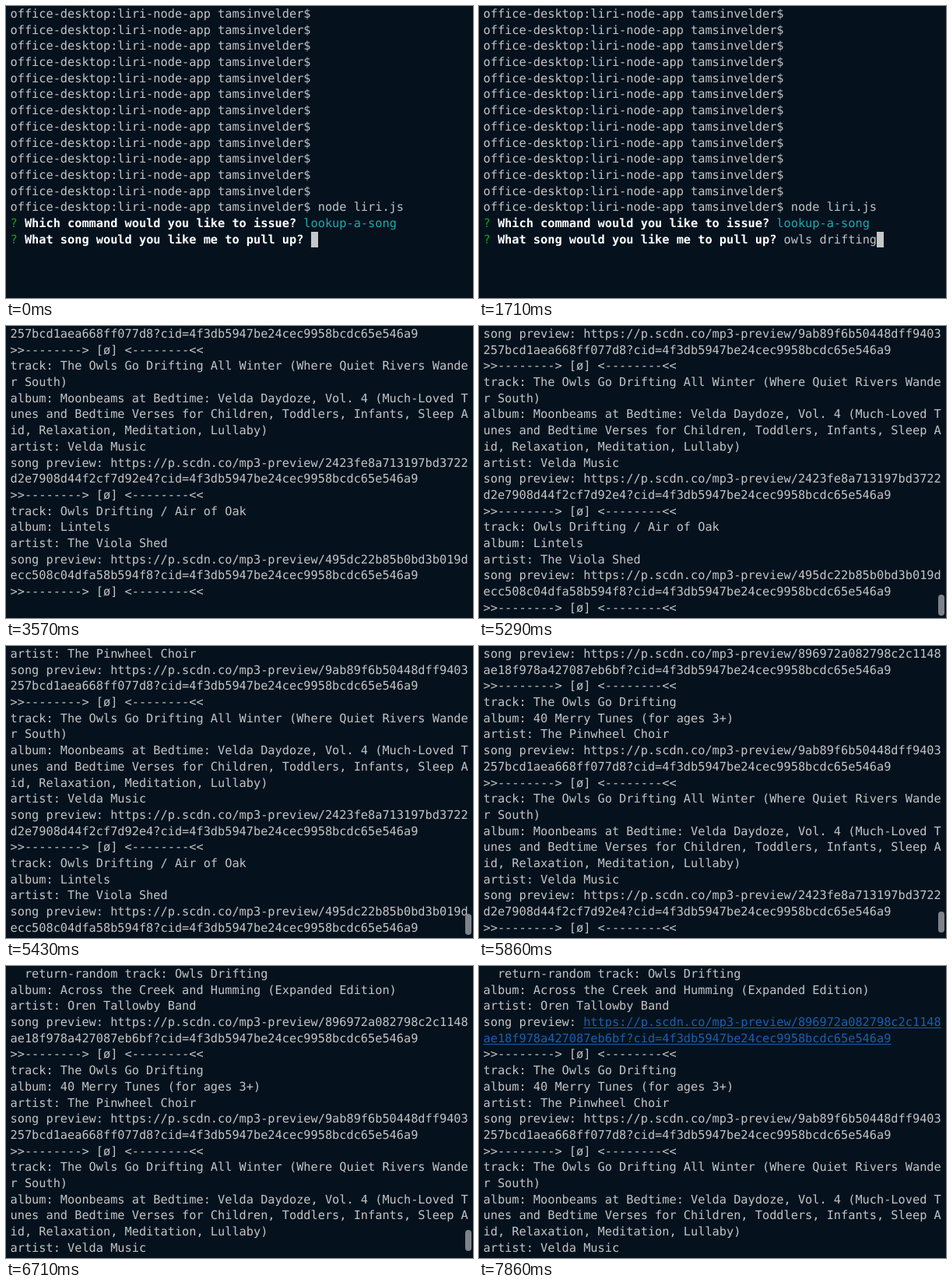
These frames come from a looping animation (600x375 px, 8000 ms). An HTML page:

```html
<!DOCTYPE html>
<html lang="en">
<head>
<meta charset="utf-8">
<title>Terminal session</title>
<style>
  html, body { margin: 0; width: 100%; height: 100%; overflow: hidden; background: #05121e; }
  #stage { position: relative; width: 600px; height: 375px; overflow: hidden; }
  #screen {
    position: absolute; left: 5.5px; top: 0;
    font: 15.27px/20.7px "DejaVu Sans Mono", monospace;
    font-variant-ligatures: none;
    text-rendering: geometricPrecision;
    white-space: pre; color: #c3c5c5;
  }
  #screen div { height: 20.7px; }
  .ask { color: #fff; font-weight: bold; }
  .mark { color: #1c9c1a; }
  .pick { color: #1fa9ac; }
  .link { color: #1c5fae; text-decoration: underline; text-decoration-thickness: 1px; text-underline-offset: 2px; }
  .cursor { display: inline-block; vertical-align: top; width: 9.2px; height: 20.5px; background: #c7c7c7; }
  #thumb { position: absolute; left: 589.5px; width: 8px; height: 27px; border-radius: 4px; background: #7d8389; }
</style>
</head>
<body>
<div id="stage"><div id="screen"></div><div id="thumb"></div></div>
<script>
const LOOP = 8000, COLS = 64, ROWS = 18;
const screen = document.getElementById('screen');
const thumb = document.getElementById('thumb');

const PROMPT = 'office-desktop:liri-node-app tamsinvelder$';
const SONG = 'owls drifting';
const SEPARATOR = '>>--------> [ø] <--------<<';

// Step tables: [time in ms, value from then on]
const typed = [[0, 0], [140, 2], [290, 3], [570, 4], [710, 5], [860, 6], [1000, 7],
  [1140, 9], [1290, 10], [1430, 11], [1570, 12], [1710, 13]];
const tracksShown = [[0, 0], [3000, 1], [3140, 2], [3290, 3], [3430, 4]];
const scrolled = [[0, 0], [5290, 1], [5430, 2], [5710, 5], [5860, 7], [6000, 8.2],
  [6140, 9.1], [6290, 9.7], [6430, 10.1], [6570, 10.4], [6710, 10.6]];
const thumbAlpha = [[0, 0], [5290, 1], [6860, 0.5], [7000, 0]];
const ENTER = 2140, MENU = 2710, HOVER = 7860;

const at = (steps, t) => steps.findLast(([start]) => start <= t)[1];
const wrap = text => text.match(new RegExp(`.{1,${COLS}}`, 'g'));

function trackLines(track, album, artist, hash) {
  const url = `https://p.scdn.co/mp3-preview/${hash}?cid=4f3db5947be24cec9958bcdc65e546a9`;
  return [`track: ${track}`, `album: ${album}`, `artist: ${artist}`, `song preview: ${url}`, SEPARATOR]
    .flatMap(wrap);
}

const tracks = [
  trackLines('Owls Drifting', 'Across the Creek and Humming (Expanded Edition)',
    'Oren Tallowby Band', '896972a082798c2c1148ae18f978a427087eb6bf'),
  trackLines('The Owls Go Drifting', '40 Merry Tunes (for ages 3+)',
    'The Pinwheel Choir', '9ab89f6b50448dff9403257bcd1aea668ff077d8'),
  trackLines('The Owls Go Drifting All Winter (Where Quiet Rivers Wander South)',
    'Moonbeams at Bedtime: Velda Daydoze, Vol. 4 (Much-Loved Tunes and Bedtime Verses ' +
    'for Children, Toddlers, Infants, Sleep Aid, Relaxation, Meditation, Lullaby)',
    'Velda Music', '2423fe8a713197bd3722d2e7908d44f2cf7d92e4'),
  trackLines('Owls Drifting / Air of Oak', 'Lintels',
    'The Viola Shed', '495dc22b85b0bd3b019decc508c04dfa58b594f8')
];

// A line is a list of [text, class] parts
const plain = text => [[text, '']];
const cursor = ['', 'cursor'];
const question = (text, ...rest) => [['?', 'mark'], [` ${text} `, 'ask'], ...rest];

function linkLines(lines) {
  const first = lines.findIndex(line => line.startsWith('song preview'));
  return lines.map((line, i) => {
    if (i === first) return [[line.slice(0, 14), ''], [line.slice(14), 'link']];
    return i === first + 1 ? [[line, 'link']] : plain(line);
  });
}

function buildLines(t) {
  const song = SONG.slice(0, at(typed, t));
  const lines = Array.from({ length: 12 }, () => plain(PROMPT));
  lines.push(
    plain(`${PROMPT} node liri.js`),
    question('Which command would you like to issue?', ['lookup-a-song', 'pick']),
    question('What song would you like me to pull up?',
      ...(t < ENTER ? [[song, ''], cursor] : [[song, 'pick']])));
  if (t >= ENTER && t < MENU) lines.push([cursor]);
  if (t < MENU) return lines;

  lines.push(
    question('Which command would you like to issue?', ['(Use arrow keys)', '']),
    [['❯ lookup-a-song', 'pick']],
    plain('  lookup-a-movie'), plain('  show-my-posts'));
  const shown = tracks.slice(0, at(tracksShown, t));
  const output = shown.flatMap((track, i) => i === 0 && t >= HOVER ? linkLines(track) : track.map(plain));
  output.push(plain(''));
  output[0] = [['  return-random ', ''], ...output[0]];
  return lines.concat(output);
}

function makePart([text, cls]) {
  const span = document.createElement('span');
  span.className = cls;
  span.textContent = text;
  return span;
}

function makeRow(parts) {
  const row = document.createElement('div');
  row.append(...parts.map(makePart));
  return row;
}

const changes = [...new Set([typed, tracksShown, scrolled, thumbAlpha].flat().map(([start]) => start)
  .concat(ENTER, MENU, HOVER))].sort((a, b) => a - b);
let current = -1;

function render(t) {
  const lines = buildLines(t);
  const scroll = at(scrolled, t);
  const top = Math.max(0, lines.length - ROWS) - Math.floor(scroll);
  screen.replaceChildren(...lines.slice(top, top + ROWS).map(makeRow));
  thumb.style.top = `${345.4 - 0.6 * scroll}px`;
  thumb.style.opacity = at(thumbAlpha, t);
}

const origin = performance.now();
function tick() {
  const t = (performance.now() - origin) % LOOP;
  const step = changes.findLast(start => start <= t);
  if (step !== current) render(current = step);
  requestAnimationFrame(tick);
}
tick();
</script>
</body>
</html>
```
